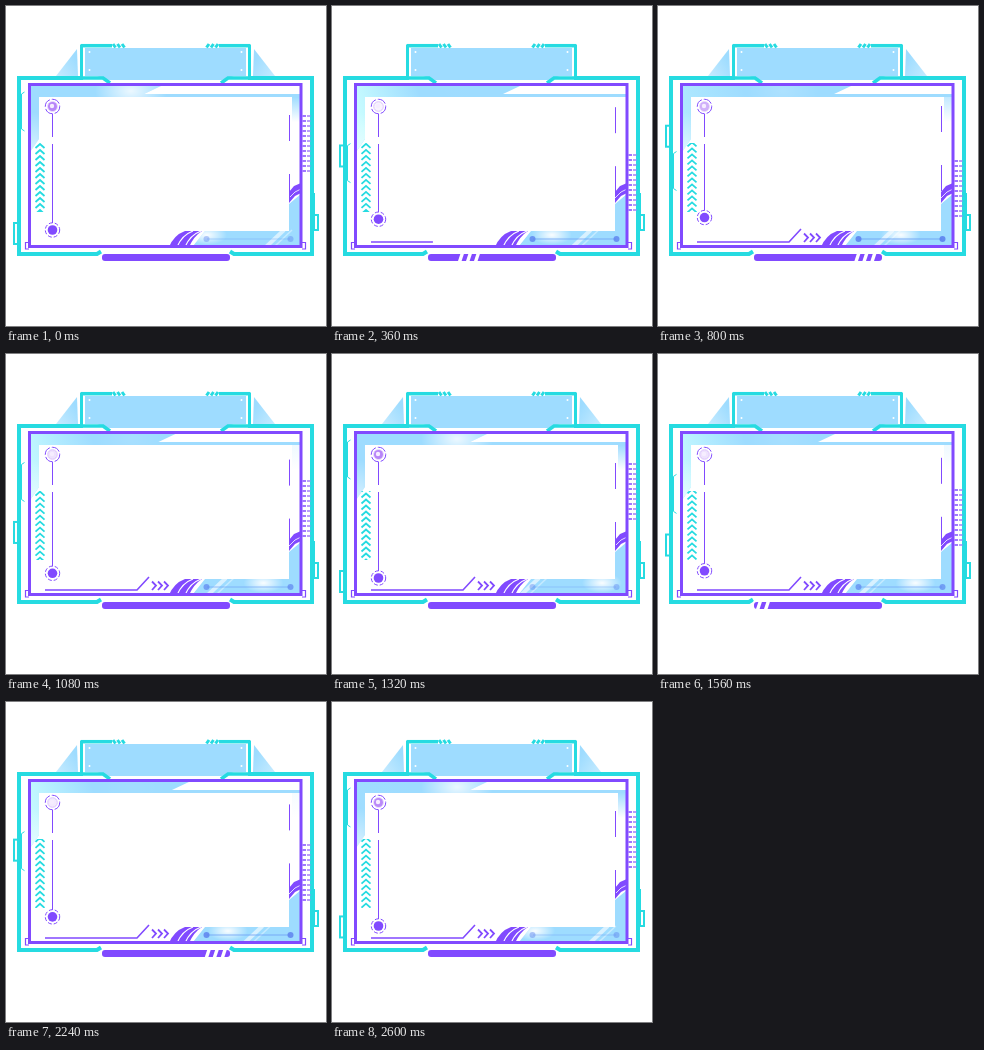
An HTML page with a canvas for the animation above (2640 ms loop, 320 by 320 pixels).

```html
<!DOCTYPE html>
<html>
<head>
<meta charset="utf-8">
<style>
html, body { margin: 0; width: 100%; height: 100%; overflow: hidden; background: #fff; }
canvas { display: block; width: 320px; height: 320px; }
</style>
</head>
<body>
<canvas id="stage" width="320" height="320"></canvas>
<script>
const ctx = document.getElementById('stage').getContext('2d');
const CYAN = '#26dbe1', PURPLE = '#814aff', BLUE = '#9edcff', WHITE = '#fff';
const LOOP = 2640, HALF = LOOP / 2, STEP = 40;

const clamp = v => Math.max(0, Math.min(1, v));
const mix = (a, b, k) => a + (b - a) * k;
const inOut = k => k < .5 ? 2 * k * k : 1 - 2 * (1 - k) * (1 - k);

function trace(points) {
  ctx.beginPath();
  for (let i = 0; i < points.length; i += 2) ctx.lineTo(points[i], points[i + 1]);
}
function line(color, width, ...points) {
  trace(points);
  ctx.strokeStyle = color;
  ctx.lineWidth = width;
  ctx.stroke();
}
function shape(color, ...points) {
  trace(points);
  ctx.fillStyle = color;
  ctx.fill();
}
function box(color, width, x, y, w, h) {
  ctx.strokeStyle = color;
  ctx.lineWidth = width;
  ctx.strokeRect(x, y, w, h);
}
function dot(color, x, y, r) {
  ctx.beginPath();
  ctx.arc(x, y, r, 0, 7);
  ctx.fillStyle = color;
  ctx.fill();
}
function ring(color, width, x, y, r, dash = []) {
  ctx.beginPath();
  ctx.arc(x, y, r, 0, 2 * Math.PI);
  ctx.setLineDash(dash);
  ctx.strokeStyle = color;
  ctx.lineWidth = width;
  ctx.stroke();
  ctx.setLineDash([]);
}
function clipped(points, paint) {
  ctx.save();
  trace(points);
  ctx.clip();
  paint();
  ctx.restore();
}
function gradient(x0, y0, x1, y1, from, to) {
  const g = ctx.createLinearGradient(x0, y0, x1, y1);
  g.addColorStop(0, from);
  g.addColorStop(1, to);
  return g;
}
function glow(x, y, rx, ry, alpha) {
  ctx.save();
  ctx.translate(x, y);
  ctx.scale(rx, ry);
  const g = ctx.createRadialGradient(0, 0, 0, 0, 0, 1);
  g.addColorStop(0, `rgba(255,255,255,${alpha})`);
  g.addColorStop(1, 'rgba(255,255,255,0)');
  ctx.fillStyle = g;
  ctx.fillRect(-1, -1, 2, 2);
  ctx.restore();
}
// Mirrors a drawing about the vertical centre line of the frame
function mirrored(paint) {
  paint();
  ctx.save();
  ctx.translate(319, 0);
  ctx.scale(-1, 1);
  paint();
  ctx.restore();
}

function header(wings, accents) {
  shape(BLUE, 79, 42, 240, 42, 240, 70, 228, 70, 216, 74, 103, 74, 91, 70, 79, 70);
  mirrored(() => {
    if (wings) shape(gradient(50, 70, 72, 56, '#c6ebff', BLUE), 50, 70, 71, 43, 72, 70);
    line(CYAN, 3, 75.5, 72, 75.5, 39);
    line(CYAN, 3.5, 74.5, 39.7, 106, 39.7);
    if (accents) for (const x of [107, 111.5, 116]) line(CYAN, 3, x, 38, x + 2.5, 41.5);
    line(CYAN, 3.5, 75, 72, 97, 72, 104, 77);
    dot(WHITE, 83.5, 46, 1);
    dot(WHITE, 83.5, 64, 1);
  });
}

function outerFrame(swing, drift) {
  mirrored(() => line(CYAN, 4, 77, 72, 13, 72, 13, 248, 91, 248, 95, 245.5));
  box(CYAN, 2, 8, mix(217, 103, swing), 5, 21);
  const y = mix(86, 172, drift);
  line(CYAN, 1, 18.5, y, 15.5, y + 2, 15.5, y + 37, 18.5, y + 39);
  line(CYAN, 3, 307.5, 187, 307.5, 225);
  box(CYAN, 2, 307, 209, 5, 15);
}

function stripes() {
  const curve = x => ctx.quadraticCurveTo(x + 5, 229, x + 16, 225);
  ctx.fillStyle = PURPLE;
  ctx.beginPath();
  ctx.moveTo(163, 241);
  curve(163);
  ctx.lineTo(196, 225);
  ctx.quadraticCurveTo(188, 230, 183, 241);
  ctx.fill();
  ctx.strokeStyle = WHITE;
  ctx.lineWidth = 1.2;
  for (const x of [171, 179]) {
    ctx.beginPath();
    ctx.moveTo(x, 241);
    curve(x);
    ctx.stroke();
  }
  shape(PURPLE, 283, 186, 288, 180, 295, 177, 295, 187, 289, 190, 283, 197);
  line(WHITE, .8, 283, 192, 289, 186, 295, 183);
}

function panel(time, drift, pulse) {
  const cut = mix(155, 210, drift);
  const band = [24, 80, cut, 80, cut - 17, 88, 295, 88, 295, 91, 33, 91, 33, 133, 24, 146];
  shape(BLUE, ...band);
  clipped(band, () => {
    ctx.globalAlpha = 1 - pulse;
    ctx.fillStyle = gradient(24, 100, 85, 80, '#c8fcff', 'rgba(200,252,255,0)');
    ctx.fillRect(24, 80, 70, 70);
    ctx.globalAlpha = 1;
    glow(125, 85, 36, 22, .8 * pulse * (1 - drift));
    glow(28, 146, 16, 40, .6);
  });
  ctx.globalAlpha = pulse;
  ctx.fillStyle = gradient(0, 91, 0, 116, BLUE, WHITE);
  ctx.fillRect(286, 91, 9, 25);
  ctx.globalAlpha = 1;

  const sweep = 1 - Math.abs(time / HALF - 1);
  const corner = [187, 240, 199, 225, 283, 225, 283, 198, 295, 188, 295, 240];
  shape(BLUE, ...corner);
  clipped(corner, () => {
    const streak = mix(269, 198, sweep);
    glow(mix(201, 270, sweep), 229, 20, 10, .95);
    line('rgba(255,255,255,.6)', 4, streak - 9, 241, streak + 9, 224);
    line('rgba(255,255,255,.4)', 1.5, streak - 1, 241, streak + 17, 224);
  });
  ctx.globalAlpha = mix(.4, .9, Math.sin(Math.PI * (time % HALF) / HALF));
  line('#6d9ff5', 1, 201, 233, 284, 233);
  dot('#5b80ee', 200.5, 233, 3);
  dot('#5b80ee', 284.5, 233, 3);
  ctx.globalAlpha = 1;

  stripes();
  box(PURPLE, 3, 23.5, 78.5, 271.5, 162);
  mirrored(() => line(PURPLE, 1.2, 23, 236.5, 19.5, 236.5, 19.5, 243, 23, 243));
}

function slider(drift, pulse) {
  const y = mix(224, 206, drift);
  line(PURPLE, 1, 46.5, 108, 46.5, 131);
  line(PURPLE, 1, 46.5, 138, 46.5, y - 7);
  ring(PURPLE, 1, 46.5, 100.5, 7.2, [9, 2]);
  ring('#e0c8fd', 1, 46.5, 100.5, 4.8);
  ctx.globalAlpha = mix(.06, .8, pulse);
  dot('#a566f6', 46.5, 100.5, 4.5);
  ctx.globalAlpha = 1;
  dot('#f6edff', 46, 100, 2.2);
  ring(PURPLE, 1, 46.5, y, 7.2, [4, 2]);
  dot(PURPLE, 46.5, y, 4.8);
}

function sideMarks(time, drift) {
  clipped([28, 137, 40, 137, 40, 206, 28, 206], () => {
    const shift = time % 352 / 352 * 6;
    for (let y = 138 - shift; y < 210; y += 6) line(CYAN, 1.8, 29.5, y + 4, 34, y, 38.5, y + 4);
  });
  const top = mix(110, 175, drift);
  for (let i = 0; i < 12; i++) {
    const y = top + i * 5;
    line(PURPLE, 1.5, 296.5, y, 300, y);
    line('#a47cf8', 1.5, 301, y, 304.5, y);
  }
  for (const y of [109, 168]) {
    const from = y - 13 * drift;
    line(PURPLE, 1, 283.5, from, 283.5, from + 26);
  }
}

function tracer(time) {
  const length = time * .172;
  if (length > 0) {
    const flat = Math.min(92, length), rise = clamp((length - 92) / 17);
    line(PURPLE, 1.6, 39, 236, 39 + flat, 236, 39 + flat + 12 * rise, 236 - 13 * rise);
  }
  for (let i = 0; i < 3; i++) {
    const x = 146 + i * 6;
    if (time >= 640 + i * STEP) line(PURPLE, 1.8, x, 227.5, x + 4, 231.5, x, 236);
  }
}

function pill(time) {
  ctx.beginPath();
  ctx.roundRect(96, 248, 128, 7, 3);
  ctx.fillStyle = PURPLE;
  ctx.fill();
  const x = 88 + (time < 1440 ? time - 54 : time - 1479) * .16;
  clipped([95, 247, 225, 247, 225, 256, 95, 256], () => {
    for (const dx of [-8, 0, 8]) line(WHITE, 3.4, x + dx - 1.5, 256, x + dx + 1.5, 247);
  });
}

function draw(now) {
  const time = Math.floor(now % LOOP / STEP) * STEP;
  const phase = time % HALF;
  const out = phase < 600;
  const drift = out ? phase / 600 : 1 - clamp((phase - 600) / 650);
  const swing = out ? inOut(phase / 600) : 1 - clamp((phase - 600) / 690) ** 1.55;
  const pulse = .5 + .5 * Math.cos(4 * Math.PI * time / HALF);

  ctx.fillStyle = WHITE;
  ctx.fillRect(0, 0, 320, 320);
  header(phase < 280 || phase >= 680, time < 1120 || time >= 1320);
  outerFrame(swing, drift);
  panel(time, drift, pulse);
  slider(drift, pulse);
  sideMarks(time, drift);
  tracer(time);
  pill(time);
}

const start = performance.now();
function tick() {
  draw(performance.now() - start);
  requestAnimationFrame(tick);
}
tick();
</script>
</body>
</html>
```
